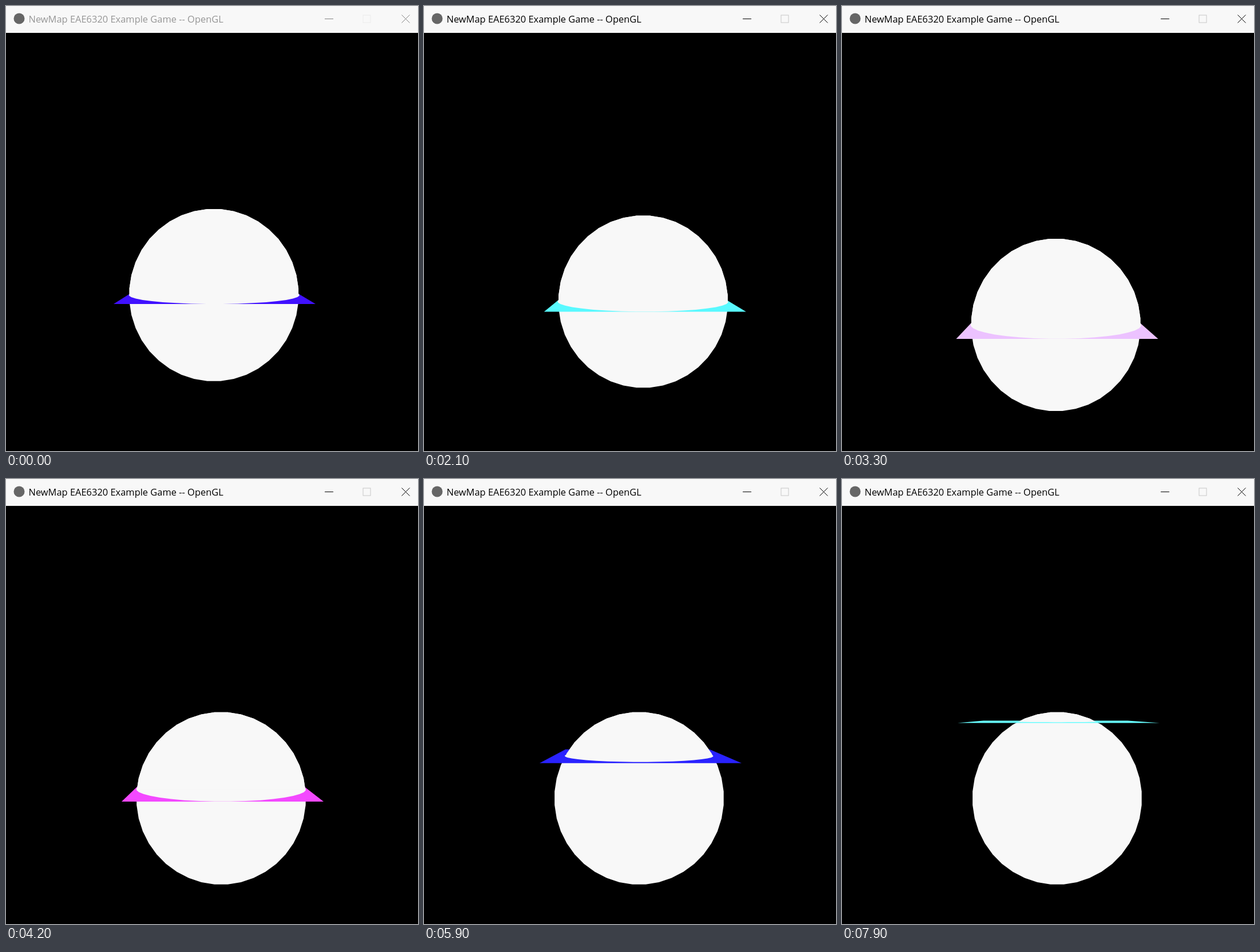
Recreate the animation shown at these times as an HTML page with a canvas. Size 720 by 778 pixels, loop 8000 ms.

```html
<!DOCTYPE html>
<html lang="en">
<head>
<meta charset="utf-8">
<title>Example Game</title>
<style>
  html, body { margin: 0; width: 100%; height: 100%; overflow: hidden; background: #000; }
  canvas { position: absolute; left: 0; top: 0; }
  #title {
    position: absolute; left: 39.5px; top: 0; line-height: 46px; white-space: pre;
    font-family: "Open Sans", "Noto Sans", sans-serif; font-size: 16.45px;
  }
</style>
</head>
<body>
<canvas id="stage" width="720" height="778"></canvas>
<div id="title">NewMap EAE6320 Example Game -- OpenGL</div>
<script>
const ctx = document.getElementById('stage').getContext('2d');
const title = document.getElementById('title');

const LOOP = 8000, STEP = 100;
const HELD = [300, 700, 1400, 3600];   // steps that repeat the previous picture
const WHITE = '#f8f8f8';

// Camera: vanishing point, focal length in pixels; depth 1 is the plane's front edge.
const VX = 360, VY = 412.5, FOCAL = 882;
const HALF = 176.5, MID = 1 + HALF / FOCAL, BACK = 1 + 2 * HALF / FOCAL;
const SIDES = 40;

const moveX = [[1580, 4.5], [2200, 30.5], [2890, 1.5], [2950, 1.5], [3360, 18.5]];
const sphereY = [[1760, 108.5], [3320, 170.2]];
const liftY = [[3730, 170.2], [6600, 56.6], [7200, 34], [7900, 14]];

function track(keys, t) {
  if (t <= keys[0][0]) return keys[0][1];
  for (let i = 1; i < keys.length; i++) {
    const [t0, v0] = keys[i - 1], [t1, v1] = keys[i];
    if (t < t1) return v0 + (v1 - v0) * (t - t0) / (t1 - t0);
  }
  return keys[keys.length - 1][1];
}

const project = (x, y, z) => [VX + x / z, VY + y / z];

function polygon(points, color) {
  ctx.beginPath();
  points.forEach(p => ctx.lineTo(...p));
  ctx.closePath();
  ctx.fillStyle = color;
  ctx.fill();
}

const ring = point => Array.from({ length: SIDES },
  (_, i) => point((i + 0.5) * 2 * Math.PI / SIDES));

function planeColor(t) {
  const wave = peak => Math.round(127.5 + 127.5 * Math.cos((t - peak) * 2 * Math.PI / 5700));
  return `rgb(${wave(3800)}, ${wave(2375)}, 255)`;
}

function drawScene(t) {
  const x = track(moveX, t), ballY = track(sphereY, t);
  const y = t < 3600 ? ballY : track(liftY, t);

  const cx = VX - 0.7 + x * 0.9, cy = VY + ballY * 0.856;
  const ball = ring(a => [cx + 148.2 * Math.cos(a), cy + 150.9 * Math.sin(a)]);
  polygon(ball, WHITE);

  polygon([
    project(x - HALF, y, 1), project(x + HALF, y, 1),
    project(x + HALF, y, BACK), project(x - HALF, y, BACK)
  ], planeColor(t));

  // Part of the sphere above the plane: its cut disc plus the outline over it.
  const r = Math.sqrt(HALF ** 2 - (ballY - y) ** 2), depth = r / FOCAL;
  polygon(ring(a => project(x + r * Math.cos(a), y, MID + depth * Math.sin(a))), WHITE);
  const cut = VY + y / (MID - depth * depth / MID);
  ctx.save();
  ctx.beginPath();
  ctx.rect(0, 0, 720, cut);
  ctx.clip();
  polygon(ball, WHITE);
  ctx.restore();
}

function drawBar(active) {
  const grey = from => to => {
    const v = Math.round(from + (to - from) * active);
    return `rgb(${v}, ${v}, ${v})`;
  };
  ctx.fillStyle = WHITE;
  ctx.fillRect(0, 0, 720, 47);

  ctx.fillStyle = '#666';
  ctx.beginPath();
  ctx.arc(23, 22, 9.5, 0, 2 * Math.PI);
  ctx.fill();

  ctx.lineWidth = 1;
  ctx.strokeStyle = grey(235)(200);
  ctx.strokeRect(624, 16, 13, 13);

  ctx.strokeStyle = grey(130)(0);
  ctx.beginPath();
  ctx.moveTo(557, 22.5); ctx.lineTo(572, 22.5);
  ctx.moveTo(691.5, 15.5); ctx.lineTo(705.5, 29.5);
  ctx.moveTo(705.5, 15.5); ctx.lineTo(691.5, 29.5);
  ctx.stroke();

  title.style.color = grey(150)(0);
}

function frame(now) {
  let t = Math.floor(now % LOOP / STEP) * STEP;
  if (HELD.includes(t)) t -= STEP;
  ctx.fillStyle = '#000';
  ctx.fillRect(0, 0, 720, 778);
  drawScene(t);
  drawBar(Math.min(1, Math.max(0, (t - 300) / 300)));
}

let start;
function tick(now) {
  start ??= now;
  frame(Math.max(0, now - start));
  requestAnimationFrame(tick);
}
frame(0);
requestAnimationFrame(tick);
</script>
</body>
</html>
```
